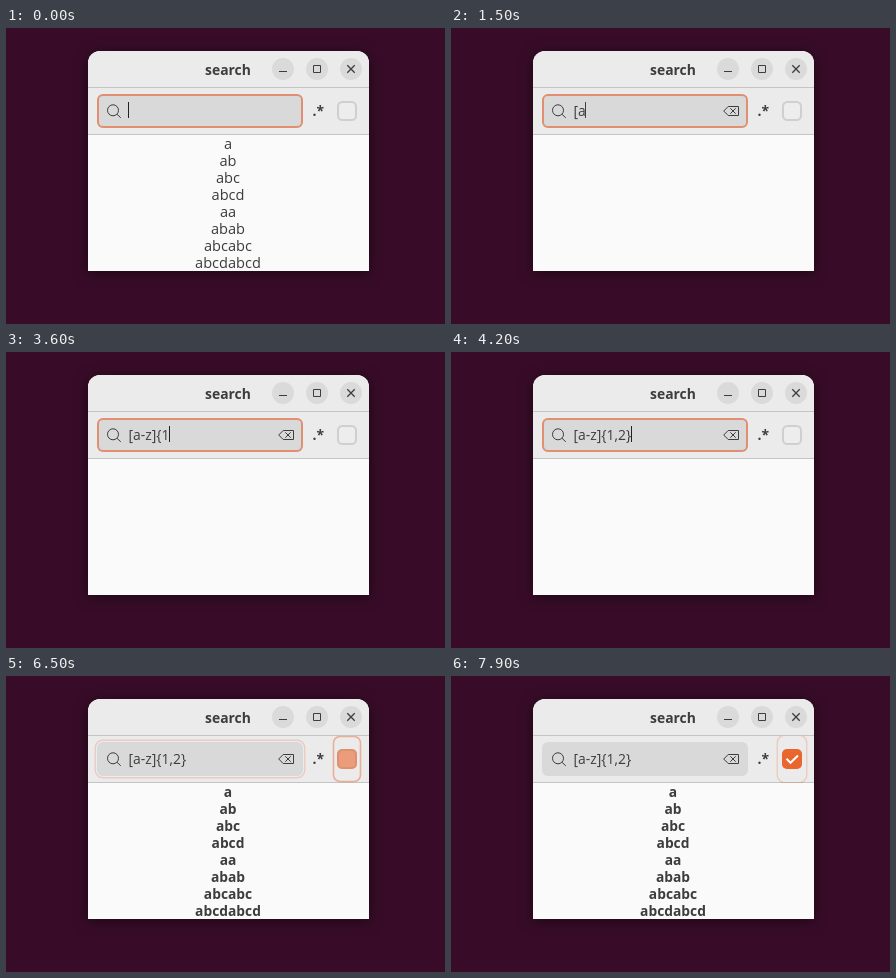
An HTML page for the animation above (8000 ms loop, 439 by 296 pixels).

```html
<!DOCTYPE html>
<html lang="en">
<head>
<meta charset="utf-8">
<title>search</title>
<style>
  html, body { margin: 0; width: 100%; height: 100%; overflow: hidden; background: #380c28; }
  svg { display: block; width: 439px; height: 296px; }
  text { font: 13.9px "Open Sans", "Noto Sans", sans-serif; fill: #3d3d3d; white-space: pre; }
  .bold { font-weight: 700; }
  .mid { text-anchor: middle; }
  #list text { font-size: 14.6px; }
  #list.bold text { font-size: 13.8px; font-weight: 700; }
  .line { fill: none; stroke: #3d3d3d; }
  .ring { fill: none; stroke: #e95420; }
  .window { filter: drop-shadow(0 2px 7px rgba(0, 0, 0, .5)); }
</style>
</head>
<body>
<svg viewBox="0 0 439 296">
  <path class="window" fill="#fafafa" d="M82 243V35a12 12 0 0 1 12-12H351a12 12 0 0 1 12 12V243Z"/>
  <path fill="#ebebeb" d="M82 107V35a12 12 0 0 1 12-12H351a12 12 0 0 1 12 12V107Z"/>
  <path stroke="#c4c4c4" d="M82 59.5H363M82 106.5H363"/>

  <text class="bold mid" x="222" y="47">search</text>
  <g fill="#dadada">
    <circle cx="277" cy="41" r="11"/><circle cx="311" cy="41" r="11"/><circle cx="345" cy="41" r="11"/>
  </g>
  <path class="line" d="M273 43.5h8M307.5 37.5h7v7h-7Z"/>
  <path class="line" stroke-width="1.3" d="M341.3 37.3l7.4 7.4m0-7.4l-7.4 7.4"/>

  <rect x="91" y="66" width="206" height="34" rx="6" fill="#d9d9d9"/>
  <rect id="entryRing" class="ring"/>
  <circle class="line" cx="107" cy="82.3" r="5.5"/>
  <path class="line" d="M111 86.3l3.8 3.5"/>
  <text id="query" x="122.5" y="88"></text>
  <rect id="caret" y="74" width="1" height="16" fill="#222"/>
  <path id="clear" class="line" d="M272.7 83l4.5-4.5h10.3v9h-10.3ZM279.3 80.3l5.4 5.4m0-5.4l-5.4 5.4"/>

  <text class="bold" x="306.5" y="88">.*</text>
  <rect x="332" y="74" width="18" height="18" rx="4.5" fill="#ededed" stroke="#cfcfcf" stroke-width="2"/>
  <rect id="checkFill" x="331" y="73" width="20" height="20" rx="5" fill="#e9662f"/>
  <path id="checkMark" fill="none" stroke="#fff" stroke-width="2" d="M335.5 82.8l4 4 7.5-7.3"/>
  <clipPath id="bar"><rect x="82" y="60" width="281" height="47"/></clipPath>
  <g clip-path="url(#bar)"><rect id="checkRing" class="ring"/></g>

  <g id="list"></g>
</svg>
<script>
const LOOP = 8000, STEP = 100;
const ITEMS = ['a', 'ab', 'abc', 'abcd', 'aa', 'abab', 'abcabc', 'abcdabcd'];
const QUERY = '[a-z]{1,2}';
const KEY_TIMES = [1100, 1400, 1600, 1800, 2600, 3100, 3600, 3700, 3900, 4200];
const LIST_EMPTY = 1200, LIST_MATCHED = 6500, FOCUS_MOVES = 6400;

const $ = id => document.getElementById(id);
const clamp = v => Math.max(0, Math.min(1, v));
const ramp = (t, from, to) => clamp((t - from) / (to - from));

function setAttributes(element, attributes) {
  for (const [name, value] of Object.entries(attributes)) element.setAttribute(name, value);
}

$('list').innerHTML = ITEMS.map((item, i) =>
  `<text class="mid" x="222" y="${121 + 17 * i}">${item}</text>`).join('');

// Evenly split blink cycle: on, fading out, off, fading in.
function blink(t) {
  const phase = (t + 1100) % 1200;
  return clamp((450 - Math.min(phase, 1200 - phase)) / 300);
}

function caretAlpha(t) {
  if (t >= FOCUS_MOVES) return 0;
  if ((t >= 3100 && t < 3900) || (t >= 4200 && t < 5000)) return 1;
  return blink(t < 4200 ? t : t + 50);
}

// A focus ring closes in on its box as it gains strength.
function drawRing(element, x, y, width, height, strength) {
  const stroke = 1 + strength;
  const inset = stroke / 2 - 3 * (1 - strength);
  setAttributes(element, {
    x: x + inset, y: y + inset,
    width: width - 2 * inset, height: height - 2 * inset,
    rx: 6 - inset, 'stroke-width': stroke, opacity: 0.55 * Math.sqrt(strength)
  });
}

function draw(t) {
  const typed = KEY_TIMES.filter(time => t >= time).length;
  const query = $('query');
  query.textContent = QUERY.slice(0, typed);
  const caretX = 122 + (typed ? Math.round(query.getComputedTextLength()) : 0);
  setAttributes($('caret'), { x: caretX, opacity: caretAlpha(t) });
  $('clear').style.display = typed ? '' : 'none';

  $('list').style.display = t >= LIST_EMPTY && t < LIST_MATCHED ? 'none' : '';
  $('list').setAttribute('class', t >= LIST_MATCHED ? 'bold' : '');

  drawRing($('entryRing'), 91, 66, 206, 34, 1 - ramp(t, 6300, 6550));
  drawRing($('checkRing'), 328, 61, 26, 44, ramp(t, 6300, 6650) - ramp(t, 7820, 7920));
  $('checkFill').setAttribute('opacity', ramp(t, 6380, 6580));
  $('checkMark').setAttribute('opacity', ramp(t, 6500, 6900));
}

const start = performance.now();
function frame() {
  const t = (performance.now() - start) % LOOP;
  draw(Math.floor(t / STEP) * STEP);
  requestAnimationFrame(frame);
}
frame();
</script>
</body>
</html>
```
